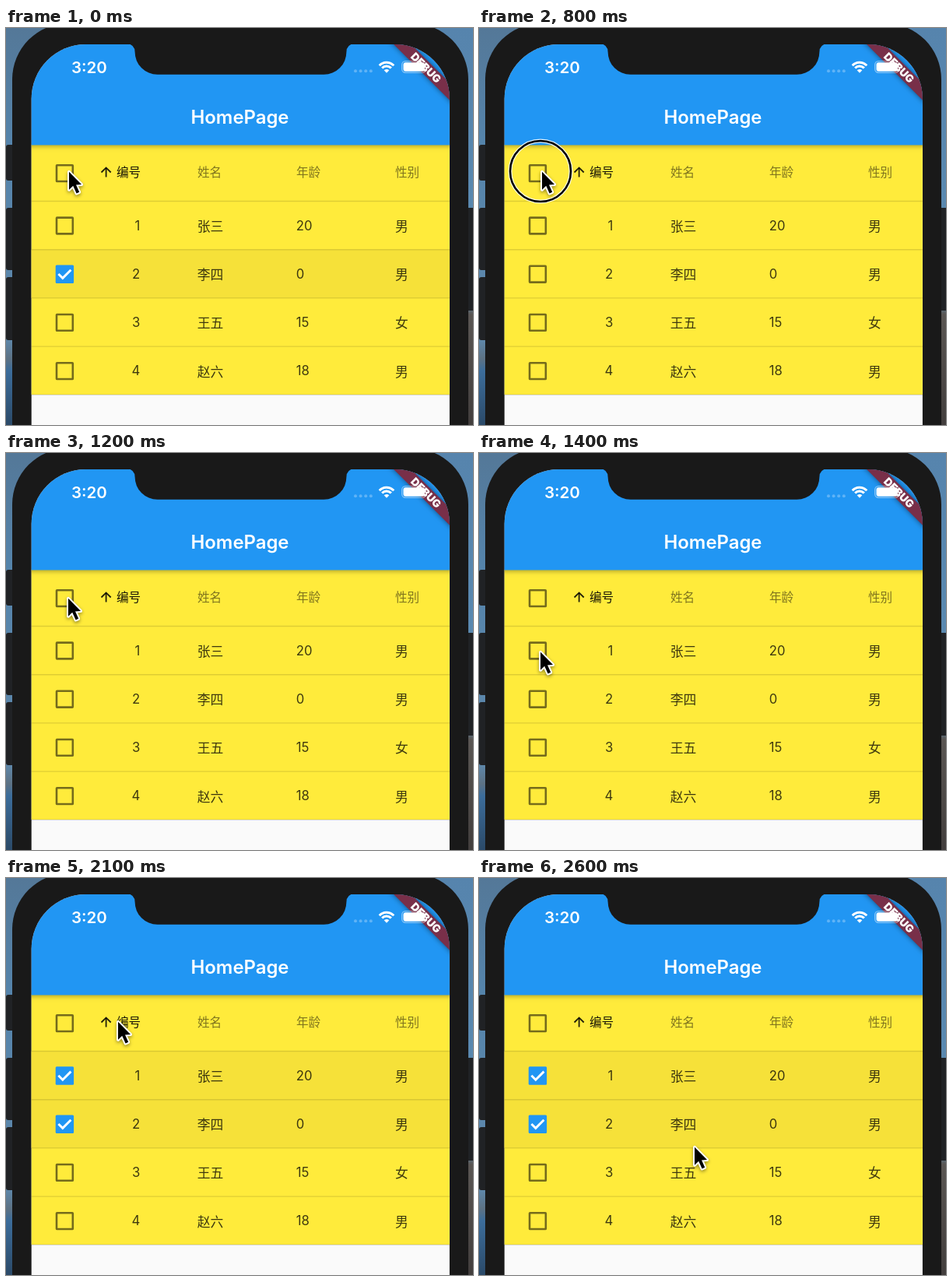
An HTML page with a canvas that plays this animation: 600 by 510 pixels, repeating every 2.7 s.

```html
<!DOCTYPE html>
<html lang="zh-CN">
<head>
<meta charset="utf-8">
<title>HomePage</title>
<style>
html, body { margin: 0; width: 100%; height: 100%; overflow: hidden; background: #191919; }
canvas { display: block; width: 600px; height: 510px; }
</style>
</head>
<body>
<canvas id="stage" width="600" height="510"></canvas>
<script>
const ctx = document.getElementById('stage').getContext('2d');
const LOOP = 2700, STEP = 100;
const BLUE = '#2196f3', YELLOW = '#ffeb3b', BODY = '#191919';
const SANS = 'Inter, "Noto Sans CJK SC", "Noto Sans CJK", sans-serif';
const HAN = '"Noto Sans CJK SC", "Noto Sans CJK", Inter, sans-serif';
const ROW_TOP = 222.5, ROW_H = 62.2;
const people = [
  ['1', '张三', '20', '男'],
  ['2', '李四', '0', '男'],
  ['3', '王五', '15', '女'],
  ['4', '赵六', '18', '男']
];

// Pointer stops: time, x, y
const pointerPath = [
  [0, 80, 182], [900, 80, 182], [1000, 78, 216], [1100, 79, 184],
  [1200, 79, 184], [1400, 78, 253], [1500, 78, 253], [1700, 78, 316],
  [1800, 78, 316], [2000, 143, 182], [2300, 143, 182], [2600, 276, 343]
];
const presses = [100, 500, 800, 1100, 1500, 1700];
// Row selections that hold from each time on
const selections = [
  [0, [1]], [200, [0, 1, 2, 3]], [600, []], [900, [0, 1, 2, 3]],
  [1200, []], [1600, [0]], [1800, [0, 1]]
];

function pointerAt(t) {
  const i = pointerPath.findIndex(p => p[0] >= t);
  if (i <= 0) return pointerPath[i < 0 ? pointerPath.length - 1 : 0].slice(1);
  const [t0, x0, y0] = pointerPath[i - 1], [t1, x1, y1] = pointerPath[i];
  const k = (t - t0) / (t1 - t0);
  return [x0 + (x1 - x0) * k, y0 + (y1 - y0) * k];
}

function box(x, y, w, h, r, fill) {
  ctx.beginPath();
  ctx.roundRect(x, y, w, h, r);
  ctx.fillStyle = fill;
  ctx.fill();
}

function line(points, color, width) {
  ctx.beginPath();
  points.forEach(([x, y]) => ctx.lineTo(x, y));
  ctx.strokeStyle = color;
  ctx.lineWidth = width;
  ctx.stroke();
}

function text(str, x, y, size, color, { weight = 400, family = SANS, align = 'left' } = {}) {
  ctx.font = `${weight} ${size}px ${family}`;
  ctx.textAlign = align;
  ctx.fillStyle = color;
  ctx.fillText(str, x, y);
}

function verticalGradient(...stops) {
  const g = ctx.createLinearGradient(0, 0, 0, 510);
  stops.forEach(([at, color]) => g.addColorStop(at / 510, color));
  return g;
}

function drawBackdrop() {
  ctx.fillStyle = verticalGradient([0, '#547898'], [150, '#5584ab'], [400, '#5e88ab'], [425, '#5d7284'], [440, '#3c6d9b'], [510, '#2b4a68']);
  ctx.fillRect(0, 0, 300, 510);
  ctx.fillStyle = verticalGradient([0, '#5684ad'], [220, '#5a89b0'], [355, '#5b7f9c'], [368, '#5a5653'], [510, '#423e3d']);
  ctx.fillRect(300, 0, 300, 510);
  [[150, 46], [231, 80], [320, 81]].forEach(([y, h]) => box(0, y, 12, h, 3, '#202225'));
  box(590, 231, 12, 132, 3, '#202225');
  box(8, -6, 586, 700, 72, BODY);
}

function drawNotch() {
  ctx.beginPath();
  ctx.moveTo(155, 20);
  ctx.quadraticCurveTo(165.6, 21, 165.6, 31);
  ctx.arcTo(165.6, 59.8, 196, 59.8, 29);
  ctx.arcTo(437.4, 59.8, 437.4, 31, 29);
  ctx.lineTo(437.4, 31);
  ctx.quadraticCurveTo(437.4, 21, 448, 20);
  ctx.fillStyle = BODY;
  ctx.fill();
}

function drawStatus() {
  text('3:20', 84, 57.5, 20.5, '#fff', { weight: 600 });
  for (let i = 0; i < 4; i++) box(447 + i * 6.6, 53.2, 4, 4, 2, 'rgba(255,255,255,.28)');
  ctx.strokeStyle = '#fff';
  ctx.lineWidth = 3;
  [12.7, 8].forEach(r => {
    ctx.beginPath();
    ctx.arc(489, 57, r, -Math.PI * .76, -Math.PI * .24);
    ctx.stroke();
  });
  ctx.beginPath();
  ctx.moveTo(489, 57.8);
  ctx.arc(489, 57.5, 4.6, -Math.PI * .76, -Math.PI * .24);
  ctx.fillStyle = '#fff';
  ctx.fill();
  ctx.beginPath();
  ctx.roundRect(508.7, 42.7, 31, 14.6, 4.5);
  ctx.strokeStyle = 'rgba(255,255,255,.45)';
  ctx.lineWidth = 1.3;
  ctx.stroke();
  box(510.5, 44.3, 27.5, 11.4, 3, '#fff');
}

function drawBanner() {
  ctx.save();
  ctx.translate(538.8, 50.5);
  ctx.rotate(Math.PI / 4);
  ctx.shadowColor = 'rgba(0,0,0,.5)';
  ctx.shadowBlur = 7;
  ctx.fillStyle = '#782f49';
  ctx.fillRect(-80, -7.9, 160, 15.8);
  ctx.shadowColor = 'transparent';
  text('DEBUG', 1, 4.8, 13.9, '#fff', { weight: 900, align: 'center' });
  ctx.restore();
}

function drawCheckbox(y, checked) {
  if (checked) {
    box(63.7, y - 11.7, 23.4, 23.4, 1.5, BLUE);
    line([[67.4, y - .2], [72.8, y + 5.2], [83.4, y - 5.4]], '#fff', 2.9);
  } else {
    ctx.beginPath();
    ctx.roundRect(65, y - 10.4, 20.8, 20.8, .6);
    ctx.strokeStyle = 'rgba(0,0,0,.54)';
    ctx.lineWidth = 2.6;
    ctx.stroke();
  }
}

function drawTable(selected) {
  ctx.fillStyle = YELLOW;
  ctx.fillRect(32, 150, 540, 321);
  drawCheckbox(186.6, selected.length === people.length);
  line([[128.6, 191.5], [128.6, 180]], 'rgba(0,0,0,.87)', 1.8);
  line([[122.5, 185.5], [128.6, 179.4], [134.7, 185.5]], 'rgba(0,0,0,.87)', 1.8);
  ['编号', '姓名', '年龄', '性别'].forEach((label, i) =>
    text(label, [142, 246, 373, 500][i], 190.8, 15.6, `rgba(0,0,0,${i ? .5 : .9})`, { weight: 500, family: HAN }));

  people.forEach(([id, name, age, gender], i) => {
    const top = ROW_TOP + i * ROW_H, mid = top + 31.5;
    const ink = 'rgba(0,0,0,.76)';
    if (selected.includes(i)) {
      ctx.fillStyle = '#f6e139';
      ctx.fillRect(32, top, 540, ROW_H);
    }
    drawCheckbox(mid, selected.includes(i));
    text(id, 172.2, mid + 5.5, 16.7, ink, { align: 'right' });
    text(name, 245.7, mid + 7, 16.8, ink, { family: HAN });
    text(age, 372.7, mid + 5.5, 16.7, ink);
    text(gender, 500, mid + 7, 16.8, ink, { family: HAN });
  });
  for (let i = 0; i <= people.length; i++) {
    const y = ROW_TOP + i * ROW_H;
    line([[32, y], [572, y]], 'rgba(0,0,0,.13)', 1.4);
  }
}

function drawScreen(selected) {
  ctx.save();
  ctx.beginPath();
  ctx.roundRect(32.7, 21, 537.2, 600, 70);
  ctx.clip();
  ctx.fillStyle = '#fafafa';
  ctx.fillRect(32, 20, 540, 490);
  drawTable(selected);
  ctx.save();
  ctx.shadowColor = 'rgba(0,0,0,.32)';
  ctx.shadowBlur = 6;
  ctx.shadowOffsetY = 2;
  ctx.fillStyle = BLUE;
  ctx.fillRect(20, 0, 564, 150.4);
  ctx.restore();
  text('HomePage', 300.5, 123, 23.9, '#fff', { weight: 600, align: 'center' });
  drawBanner();
  drawStatus();
  ctx.restore();
  drawNotch();
}

function drawRing(x, y) {
  ctx.beginPath();
  ctx.arc(x - 1, y + 2, 39, 0, Math.PI * 2);
  ctx.strokeStyle = 'rgba(255,255,255,.85)';
  ctx.lineWidth = 5;
  ctx.stroke();
  ctx.strokeStyle = '#000';
  ctx.lineWidth = 2.6;
  ctx.stroke();
}

function drawPointer(x, y) {
  const shape = [[0, 0], [0, 23], [5.2, 18], [9.6, 27.6], [13.2, 26], [9, 16.6], [16, 16.2]];
  ctx.save();
  ctx.translate(x + 1, y + 2.8);
  ctx.beginPath();
  shape.forEach(([px, py]) => ctx.lineTo(px, py));
  ctx.closePath();
  ctx.lineJoin = 'round';
  ctx.shadowColor = 'rgba(0,0,0,.4)';
  ctx.shadowBlur = 4;
  ctx.shadowOffsetY = 2;
  ctx.strokeStyle = '#fff';
  ctx.lineWidth = 4;
  ctx.stroke();
  ctx.shadowColor = 'transparent';
  ctx.fillStyle = '#000';
  ctx.fill();
  ctx.restore();
}

function render(now) {
  const t = Math.floor((now % LOOP) / STEP) * STEP;
  const selected = selections.filter(([from]) => from <= t).pop()[1];
  const [x, y] = pointerAt(t);
  drawBackdrop();
  drawScreen(selected);
  if (presses.includes(t)) drawRing(x, y);
  drawPointer(x, y);
}

const start = performance.now();
function tick() {
  render(performance.now() - start);
  requestAnimationFrame(tick);
}
tick();
</script>
</body>
</html>
```
